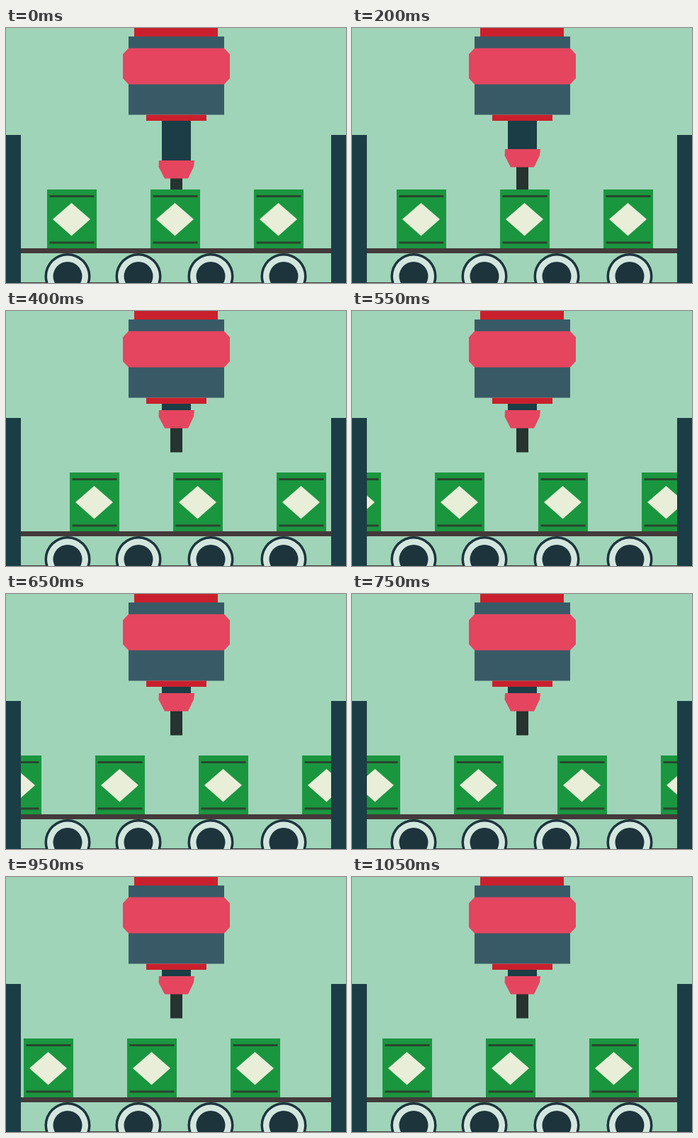
An HTML page with a canvas for the animation above (1.15 s loop, 480 by 360 pixels).

```html
<!DOCTYPE html>
<html lang="en">
<head>
<meta charset="utf-8">
<title>Press line</title>
<style>
html, body { margin: 0; width: 100%; height: 100%; overflow: hidden; background: #9fd4b8; }
canvas { display: block; width: 480px; height: 360px; }
</style>
</head>
<body>
<canvas id="stage" width="480" height="360"></canvas>
<script>
const ctx = document.getElementById('stage').getContext('2d');

const LOOP = 1150, TICK = 50, STEP = 60, LAST_STEP = 17;
const SPACING = 146, SPEED = 9, LIFT = 47;
const C = {
  bg: '#9fd4b8', navy: '#1b3d45', slate: '#385a66', red: '#ca202e',
  pink: '#e5455f', rod: '#26332f', box: '#1a963f', line: '#2a452d',
  cream: '#e9eed8', belt: '#433a3a', tire: '#1d343c', rim: '#d3e7de'
};

function rect(color, x, y, w, h) {
  ctx.fillStyle = color;
  ctx.fillRect(x, y, w, h);
}

function poly(color, ...pts) {
  ctx.fillStyle = color;
  ctx.beginPath();
  for (const [x, y] of pts) ctx.lineTo(x, y);
  ctx.fill();
}

function disc(color, x, y, r) {
  ctx.fillStyle = color;
  ctx.beginPath();
  ctx.arc(x, y, r, 0, Math.PI * 2);
  ctx.fill();
}

function drawTool(lift) {
  const y = 187 - lift;
  rect(C.navy, 220, 130, 41, y - 130);
  rect(C.rod, 232, y + 25, 17, 34.5);
  poly(C.pink, [216, y], [266, y], [265, y + 9], [257, y + 25.5], [224, y + 25.5], [215.5, y + 9]);
}

function drawMachine() {
  rect(C.red, 181, 0, 118, 12);
  rect(C.slate, 173, 12, 135, 110.5);
  poly(C.pink, [173, 28.5], [308, 28.5], [316, 37], [316, 71],
    [308, 79.5], [173, 79.5], [165, 71], [165, 37]);
  rect(C.red, 198, 122.5, 85, 8.5);
}

function drawBox(x) {
  rect(C.box, x, 228, 70, 84);
  rect(C.line, x + 3.5, 236, 63, 3);
  rect(C.line, x + 3.5, 301.5, 63, 3);
  const cx = x + 34.5;
  poly(C.cream, [cx - 26.5, 270], [cx, 247], [cx + 26.5, 270], [cx, 293.5]);
}

function drawWheel(x) {
  disc(C.tire, x, 350.5, 32.5);
  disc(C.rim, x, 350.5, 29);
  disc(C.tire, x, 350.5, 20.5);
}

function draw(time) {
  // Motion advances in 60 ms steps, shown on a 50 ms clock.
  const tick = Math.floor(time / TICK) * TICK;
  const step = Math.min(LAST_STEP, Math.max(0, Math.floor((tick - 5) / STEP)));
  const shift = Math.max(0, 5 + SPEED * (step - 3));
  const lift = LIFT * Math.pow(Math.min(1, step / 6), 1.55);

  rect(C.bg, 0, 0, 480, 360);
  drawTool(lift);
  drawMachine();
  for (let i = -1; i < 3; i++) drawBox(58 + shift + i * SPACING);
  rect(C.belt, 21, 311, 438, 7);
  rect(C.belt, 21, 359, 438, 1);
  [87, 187, 289, 392].forEach(drawWheel);
  rect(C.navy, 0, 151, 21, 209);
  rect(C.navy, 459, 151, 21, 209);
}

let start;
function loop(now) {
  start ??= now;
  draw((now - start) % LOOP);
  requestAnimationFrame(loop);
}
draw(0);
requestAnimationFrame(loop);
</script>
</body>
</html>
```
